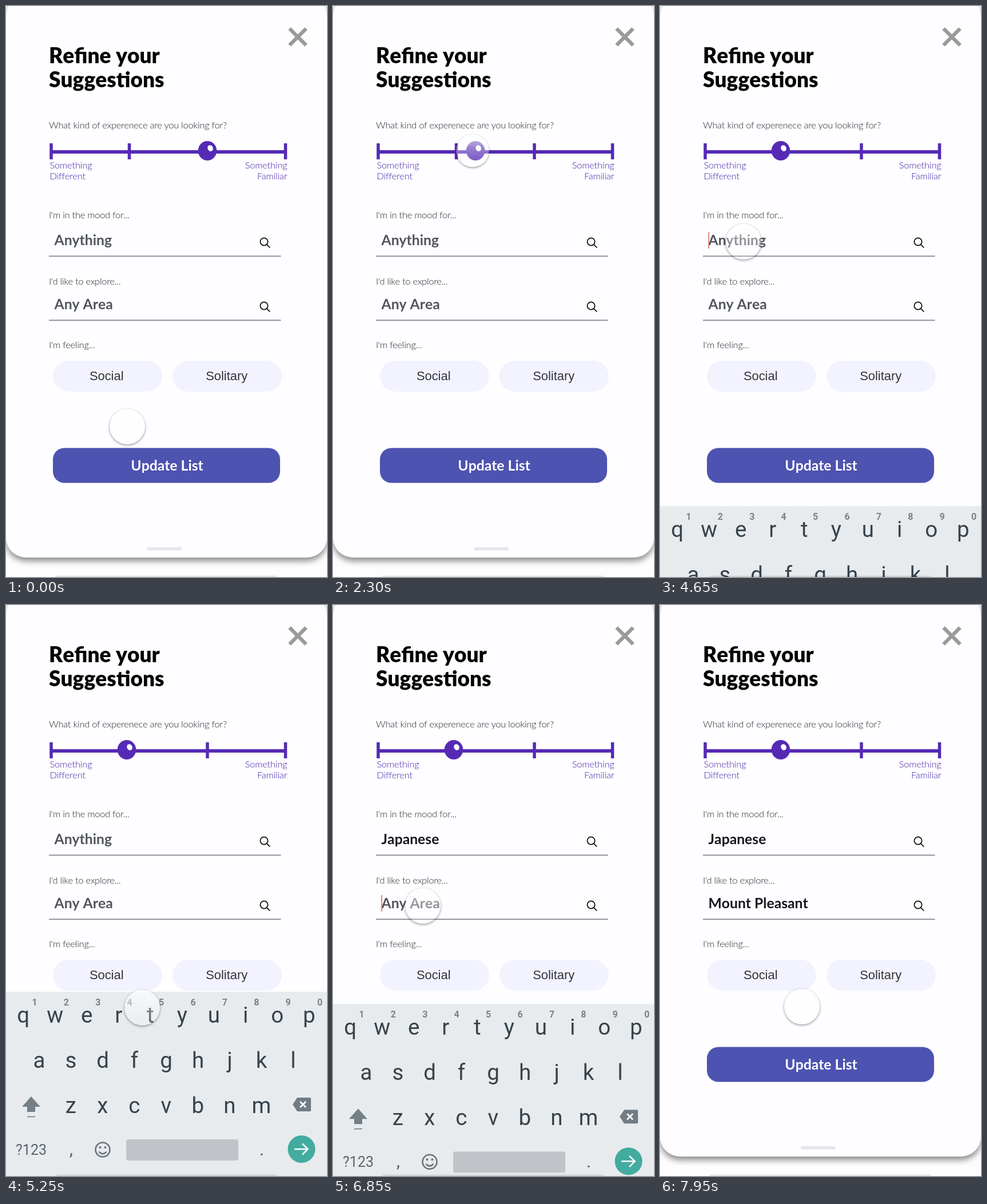
An HTML page for the animation above (8000 ms loop, 561 px wide and 998 px high).

```html
<!DOCTYPE html>
<html lang="en">
<head>
<meta charset="utf-8">
<title>Refine your Suggestions</title>
<style>
  html, body { margin: 0; width: 100%; height: 100%; overflow: hidden; background: #fdfdfe; }
  #stage { position: absolute; left: 0; top: 0; width: 561px; height: 998px; overflow: hidden; }
  svg { position: absolute; left: 0; top: 0; }
  text { font-family: Lato, sans-serif; }
  .card { fill: #fefdff; filter: drop-shadow(0 6px 5.5px rgba(0, 0, 0, .45)); }
  .title { font-size: 37px; font-weight: 900; font-kerning: none; fill: #050507; }
  .label { font-size: 16.5px; font-weight: 300; letter-spacing: -.28px; fill: #25282d; }
  .hint { font-size: 16.4px; font-weight: 300; letter-spacing: -.15px; fill: #4420a8; }
  .value { font-size: 24.7px; font-weight: 700; font-kerning: none; }
  .pill { font: 21.9px "Liberation Sans", Helvetica, sans-serif; fill: #333338; }
  #keyboard text { font-family: Roboto, sans-serif; text-anchor: middle; }
  .key { font-size: 38.5px; fill: #37434b; }
  .digit { font-size: 16px; font-weight: 700; fill: #7b8186; }
  .symbol { font-size: 25px; fill: #5a656c; }
  .mid { text-anchor: middle; }
  .end { text-anchor: end; }
  #cursor {
    position: absolute; left: 0; top: 0; width: 62px; height: 62px; margin: -31px 0 0 -31px;
    border-radius: 50%;
    background: linear-gradient(rgba(255, 255, 255, .76), rgba(255, 255, 255, .38) 45%, rgba(255, 255, 255, .14));
    box-shadow: 0 1.5px 4px rgba(0, 0, 0, .42);
  }
</style>
</head>
<body>
<div id="stage">
  <svg width="561" height="998" viewBox="0 0 561 998">
    <rect class="card" y="-17" width="561" height="981" rx="35"/>
    <rect x="246" y="946" width="61" height="5.5" rx="2.7" fill="#e6e6ea"/>
    <path d="M495.500 39.500L524.500 68.500M524.500 39.500L495.500 68.500" stroke="#9a9a9b" stroke-width="6.500"/>

    <text class="title" x="75" y="99.500">Refine your</text>
    <text class="title" x="75" y="142">Suggestions</text>

    <text class="label" x="75" y="214">What kind of experenece are you looking for?</text>
    <path d="M79 255H488.500" stroke="#552bb5" stroke-width="6"/>
    <path d="M79 240V268M215.500 240V268M352 240V268M488.500 240V268" stroke="#552bb5" stroke-width="5.500"/>
    <text class="hint" x="76.500" y="284">Something</text>
    <text class="hint" x="76.500" y="303">Different</text>
    <text class="hint end" x="491.500" y="284">Something</text>
    <text class="hint end" x="491.500" y="303">Familiar</text>
    <g id="knob">
      <ellipse cy="253" rx="16.300" ry="17" fill="#552bb5"/>
      <ellipse cx="5" cy="248.500" rx="4.600" ry="5.500" transform="rotate(-25 5 248.500)" fill="#fff"/>
    </g>

    <text class="label" x="75" y="371">I'm in the mood for...</text>
    <text class="value" id="mood" x="84.500" y="418"></text>
    <text class="label" x="75" y="487">I'd like to explore...</text>
    <text class="value" id="area" x="84.500" y="530"></text>
    <path d="M75 437.200H480.500M75 549.200H480.500" stroke="#777782" stroke-width="1.400"/>
    <g id="search" fill="none" stroke="#111" stroke-width="1.800">
      <circle cx="451" cy="412" r="6.600"/>
      <path d="M455.800 416.800L461.300 422.500"/>
    </g>
    <use href="#search" y="112"/>
    <rect id="caret" x="84.500" width="1.500" height="29" fill="#d9695f"/>

    <text class="label" x="75" y="598">I'm feeling...</text>
    <rect x="82" y="620" width="191" height="54" rx="27" fill="#f2f3ff"/>
    <rect x="291" y="620" width="191" height="54" rx="27" fill="#f2f3ff"/>
    <text class="pill mid" x="175.700" y="653.500">Social</text>
    <text class="pill mid" x="385.700" y="653.500">Solitary</text>

    <rect x="82" y="772.500" width="397" height="61" rx="20" fill="#4d53b0"/>
    <text class="value mid" x="281.500" y="812" fill="#fff">Update List</text>

    <g id="keyboard">
      <rect width="561" height="330" fill="#e8ebee"/>
      <g id="keys"></g>
      <path d="M44 183L60 201H51V210H37V201H28ZM37 217.500H51V219.300H37Z" fill="#757f86"/>
      <path d="M509 185H531Q533 185 533 187V207Q533 209 531 209H509L501 197Z" fill="#717c84"/>
      <path d="M514 192L524 202M524 192L514 202" stroke="#fff" stroke-width="2.600"/>
      <text class="symbol" x="44" y="285">?123</text>
      <text class="symbol" x="114" y="285" style="font-size:32px">,</text>
      <text class="symbol" x="447" y="286" style="font-size:32px">.</text>
      <g fill="none" stroke="#6a747b" stroke-width="2.600">
        <circle cx="169" cy="276" r="12.500"/>
        <path d="M162.500 279.500Q169 287 175.500 279.500"/>
      </g>
      <circle cx="164.500" cy="272" r="2" fill="#6a747b"/>
      <circle cx="173.500" cy="272" r="2" fill="#6a747b"/>
      <rect x="210" y="258" width="196" height="37" rx="3.500" fill="#c0c3c8"/>
      <circle cx="516.500" cy="275" r="24" fill="#43ab9f"/>
      <path d="M504 275H527M518 265.500L527.500 275L518 284.500" fill="none" stroke="#fff" stroke-width="2.500"/>
    </g>
    <rect x="85" y="996" width="390" height="10" rx="5" fill="rgba(0,0,0,.13)" style="filter:blur(1px)"/>
  </svg>
  <div id="cursor"></div>
</div>
<script>
const $ = id => document.getElementById(id);
const LOOP = 8000;

// Letter rows: characters, centre of the first key, baseline
const rows = [["qwertyuiop", 30.3, 54], ["asdfghjkl", 58, 133], ["zxcvbnm", 113.3, 211.5]];
const keyText = (cls, x, y, char) => `<text class="${cls}" x="${x}" y="${y}">${char}</text>`;
$("keys").innerHTML = rows.map(([chars, x, y]) =>
  [...chars].map((c, i) => keyText("key", x + 55.5 * i, y, c)).join("")).join("") +
  [..."1234567890"].map((c, i) => keyText("digit", 50 + 55.4 * i, 24, c)).join("");

const smooth = u => u * u * (3 - 2 * u);

// Each stop is [time, ...values]; values ease between stops.
function track(stops, t) {
  const next = stops.findIndex(s => s[0] > t);
  if (next === 0) return stops[0].slice(1);
  if (next < 0) return stops.at(-1).slice(1);
  const a = stops[next - 1], b = stops[next];
  const k = smooth((t - a[0]) / (b[0] - a[0]));
  return a.slice(1).map((v, i) => v + (b[i + 1] - v) * k);
}

const cursorPath = [
  [400, 212, 735], [1500, 347, 253],
  [1840, 347, 253], [2540, 206, 253],
  [3560, 206, 253], [4310, 146, 412],
  [4800, 146, 412], [5300, 240.6, 712],
  [5823, 240.6, 712], [6463, 157, 526],
  [6950, 157, 526], [7450, 248, 702]
];
const knobPath = [[1840, 352], [2540, 211]];
const keyboardPath = [
  [4500, 998], [4857, 676], [5480, 676], [5840, 998],
  [6550, 998], [6907, 676], [7550, 676], [7900, 998]
];
const presses = [[1650, 2700], [4400, 4500], [5370, 5470], [6490, 6570], [7470, 7560]];
const edits = [
  { id: "mood", from: 4500, to: 5480, before: "Anything", after: "Japanese", caretY: 395 },
  { id: "area", from: 6550, to: 7550, before: "Any Area", after: "Mount Pleasant", caretY: 507 }
];

function render(t) {
  const [x, y] = track(cursorPath, t);
  const press = Math.max(0, ...presses.map(([from, to]) =>
    Math.min(1, (t - from + 80) / 80, (to + 80 - t) / 80)));
  $("cursor").style.transform = `translate(${x}px, ${y}px) scale(${1 - press * 0.08})`;
  $("knob").setAttribute("transform", `translate(${track(knobPath, t)[0]} 0)`);
  $("keyboard").setAttribute("transform", `translate(0 ${track(keyboardPath, t)[0]})`);

  let caretY = -100;
  for (const edit of edits) {
    const done = t >= edit.to;
    $(edit.id).textContent = done ? edit.after : edit.before;
    $(edit.id).setAttribute("fill", done ? "#15171c" : "#50555d");
    if (t >= edit.from && !done && (t - edit.from) % 1000 < 500) caretY = edit.caretY;
  }
  $("caret").setAttribute("y", caretY);
}

const start = performance.now();
function tick() {
  render((performance.now() - start) % LOOP);
  requestAnimationFrame(tick);
}
tick();
</script>
</body>
</html>
```
